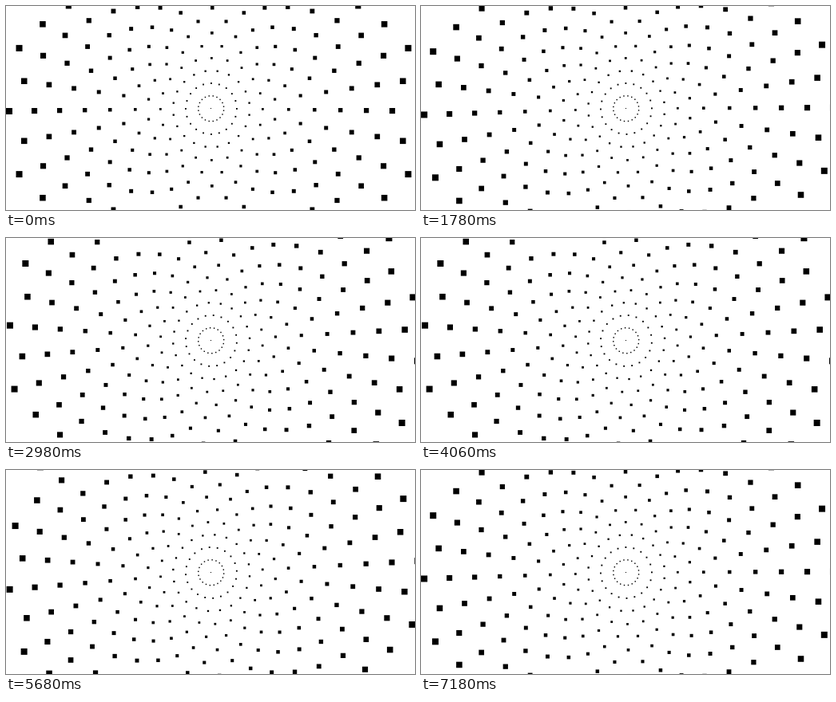
Write an HTML page with a canvas that moves like this. It is 512x256 px and loops after 7.2 s.

```html
<!DOCTYPE html>
<html>
<head>
<meta charset="utf-8">
<style>
html, body { margin: 0; width: 100%; height: 100%; overflow: hidden; background: #fff; }
canvas { display: block; }
</style>
</head>
<body>
<canvas id="stage" width="512" height="256"></canvas>
<script>
const ctx = document.getElementById('stage').getContext('2d');
const RINGS = 16, DOTS = 20, GAP = 16, STEP = 20, LOOP = 7200;
const MIN_SIZE = 1, MAX_SIZE = 8;
const start = performance.now();

function draw(now) {
  // the whole field turns clockwise, one degree per step
  const turn = Math.floor(Math.max(0, now - start) % LOOP / STEP);
  ctx.fillStyle = '#fff';
  ctx.fillRect(0, 0, 512, 256);
  ctx.fillStyle = '#000';
  ctx.fillRect(256, 128, MIN_SIZE, MIN_SIZE);
  for (let ring = 1; ring <= RINGS; ring++) {
    const size = MIN_SIZE + (MAX_SIZE - MIN_SIZE) * ring / RINGS;
    for (let i = 0; i < DOTS; i++) {
      // odd rings sit half a gap further round
      const angle = (turn + (i + ring % 2 / 2) * 360 / DOTS) * Math.PI / 180;
      const x = 256 + ring * GAP * Math.cos(angle);
      const y = 128 + ring * GAP * Math.sin(angle);
      ctx.fillRect(x, y, size, size);
    }
  }
  requestAnimationFrame(draw);
}
draw(start);
</script>
</body>
</html>
```
